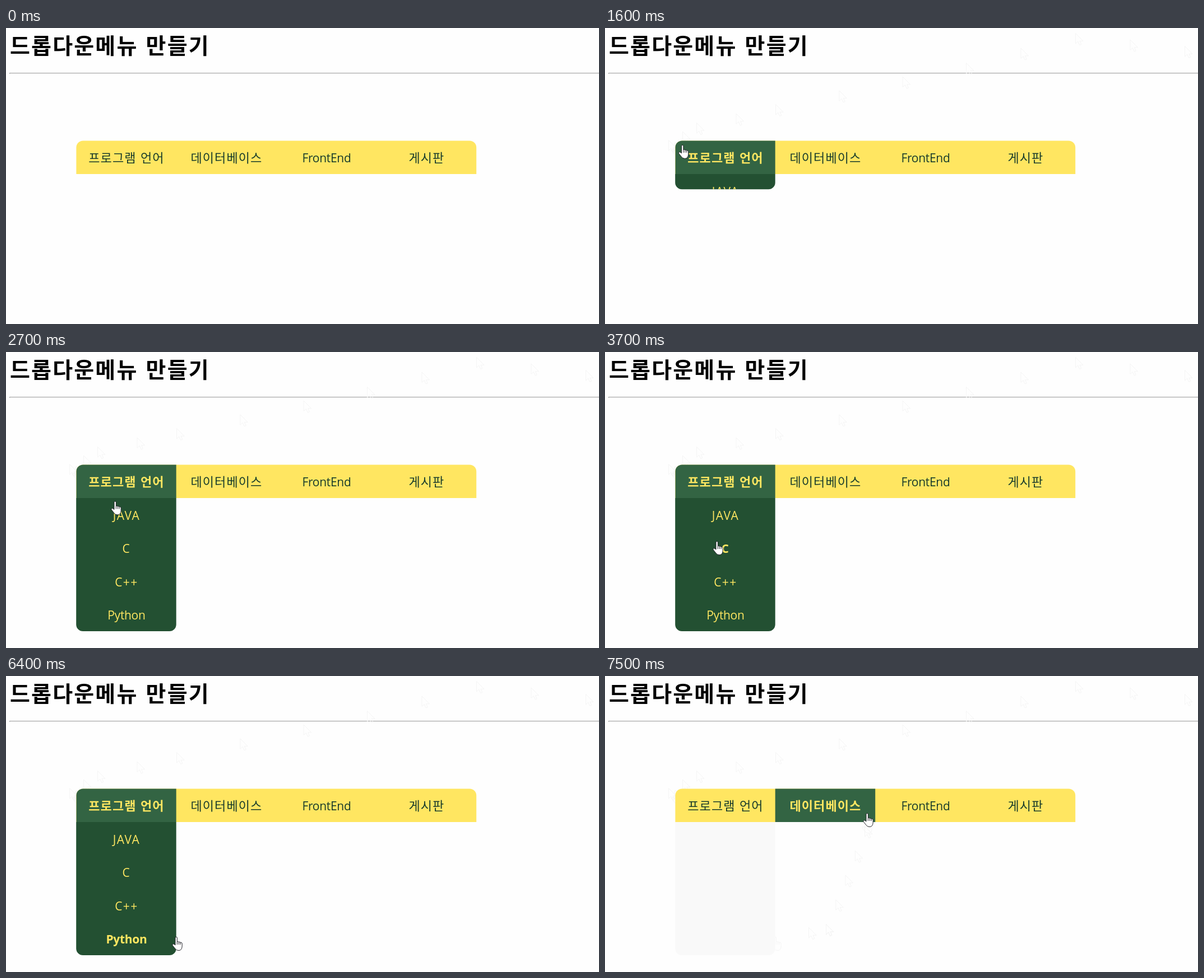
An HTML page that plays this animation: 1058x529 px, repeating every 8000 ms.

```html
<!DOCTYPE html>
<html lang="ko">
<head>
<meta charset="utf-8">
<title>드롭다운메뉴 만들기</title>
<style>
  html, body { margin: 0; width: 100%; height: 100%; overflow: hidden; background: #fefefe; }
  svg { display: block; width: 100%; height: 100%; }
  text { font-family: "Open Sans", "Noto Sans CJK KR", "Noto Sans CJK", sans-serif; font-size: 21px;
         text-anchor: middle; fill: #173b2b; }
  .ko { font-family: "Noto Sans CJK KR", "Noto Sans CJK", sans-serif; font-size: 22px; letter-spacing: 1.1px; }
  .latin { letter-spacing: -.3px; }
  .wide { letter-spacing: 1.4px; }
  .title { font-size: 39px; font-weight: 700; letter-spacing: 2.2px; word-spacing: 1px; text-anchor: start; fill: #000; }
  #items text, text.on { fill: #ffe761; }
  text.on { font-weight: 700; }
  #cursor { fill: #fff; stroke: #1b1b22; stroke-width: .95; }
  #trail { fill: none; stroke: #f5f5f5; }
</style>
</head>
<body>
<svg viewBox="0 0 1058 529">
  <defs>
    <path id="arrow" d="M.5.5V19L4.8 15.1 7.8 21.6 10.8 20.2 8 14.2H14Z"/>
    <g id="hand" transform="translate(-7 0)" stroke-linejoin="round">
      <path d="M6 15V2Q6 .5 7.7 .5T9.4 2V9Q10.8 7.8 12.4 9.4 13.8 8.6 15.2 10.2 17.8 9.6 18.2 12V17Q17.8 24.5 12 24.5 8 24.5 6 21.5L1 15.2Q.5 13 2.5 12.8 4.5 13.5 6 15Z"/>
      <path d="M9.4 9V14M12.4 9.4V14M15.2 10.2V14" fill="none"/>
    </g>
    <clipPath id="barShape"><rect x="125.4" y="201.5" width="713.8" height="80" rx="12"/></clipPath>
    <clipPath id="opening"><use href="#panel"/></clipPath>
  </defs>
  <rect width="1058" height="529" fill="#fefefe"/>
  <text class="ko title" x="7" y="45.5">드롭다운메뉴 만들기</text>
  <path d="M6 80.5H1058M6.5 80V82" stroke="#a6a6a6"/>
  <path d="M7 81.5H1058" stroke="#ececec"/>
  <g id="trail"></g>
  <path id="residue" fill="#f9f9f9"/>
  <g clip-path="url(#barShape)">
    <rect x="125" y="201" width="715" height="60" fill="#ffe661"/>
    <rect id="tab" y="201" width="178.5" height="60" fill="#336443"/>
  </g>
  <g id="heads"></g>
  <path id="panel" fill="#235032"/>
  <g id="items" clip-path="url(#opening)"></g>
  <use id="cursor"/>
</svg>
<script>
const LOOP = 8000, STEP = 100;
const LEFT = 125.2, TOP = 201, COL = 178.5, ROW = 59.5, BAR_END = 261, FULL = 4 * ROW;
const $ = id => document.getElementById(id);

function set(node, attrs) {
  for (const key in attrs) node.setAttribute(key, attrs[key]);
  return node;
}
const add = (parent, tag, attrs) =>
  parent.appendChild(set(document.createElementNS('http://www.w3.org/2000/svg', tag), attrs));
const show = (node, on) => set(node, { visibility: on ? 'visible' : 'hidden' });

// Pointer glides: start, end, then the point reached; it rests in between.
const ENTRY = { time: 300, x: 1034, y: 32 };
const glides = [
  [300, 500, 839, 9], [500, 700, 644, 62], [700, 1000, 304, 136], [1000, 1200, 163, 169],
  [1200, 1400, 113, 200], [1400, 1800, 162, 217.5],
  [2300, 2700, 194, 266.5], [2700, 2900, 193, 281],
  [3200, 3700, 199, 338],
  [4100, 4900, 271, 421],
  [5100, 5600, 279, 471],
  [6300, 6400, 303, 466], [6400, 6500, 363, 449], [6500, 6600, 394, 443],
  [6900, 7300, 463, 268], [7300, 7500, 467, 245]
];

function pointer(t) {
  let { x, y } = ENTRY;
  for (const [start, end, toX, toY] of glides) {
    const p = Math.min(1, Math.max(0, (t - start) / (end - start)));
    x += (toX - x) * p;
    y += (toY - y) * p;
  }
  return { x, y };
}

// Column and drop-down row under a point; -1 means none.
function hit({ x, y }) {
  const inside = x >= LEFT && x < LEFT + 4 * COL && y >= TOP;
  const column = inside ? Math.floor((x - LEFT) / COL) : -1;
  if (y < BAR_END) return { column, row: -1 };
  if (column !== 0 || y >= BAR_END + FULL) return { column: -1, row: -1 };
  return { column, row: Math.floor((y - BAR_END - 12) / ROW) };
}

const samples = [];
for (let time = ENTRY.time; time < LOOP; time += STEP) {
  const at = pointer(time), target = hit(at);
  const look = { href: target.column < 0 ? '#arrow' : '#hand', transform: `translate(${at.x} ${at.y})` };
  samples.push({ time, ...target, look, ghost: add($('trail'), 'use', look) });
}
const onMenu = samples.filter(s => s.column === 0);
const opened = onMenu[0].time, closed = onMenu[onMenu.length - 1].time + STEP;

function label(group, name, cls, x, y) {
  const node = add($(group), 'text', { x, y });
  node.textContent = name;
  return { node, cls };
}
const heads = ['프로그램 언어', '데이터베이스', 'FrontEnd', '게시판'].map((name, i) =>
  label('heads', name, name === 'FrontEnd' ? 'latin' : 'ko', LEFT + COL * (i + 0.5) + 0.5, 239.7));
const items = ['JAVA', 'C', 'C++', 'Python'].map((name, i) =>
  label('items', name, name === 'Python' ? 'latin' : 'wide', LEFT + COL / 2 + 0.5, 299.5 + ROW * i));
const mark = (labels, active) => labels.forEach(({ node, cls }, i) =>
  set(node, { class: cls + (i === active ? ' on' : '') }));

function panelPath(h) {
  const r = Math.min(12, h), bottom = BAR_END + h;
  return `M${LEFT} ${BAR_END}h${COL}V${bottom - r}a${r} ${r} 0 0 1 ${-r} ${r}h${2 * r - COL}a${r} ${r} 0 0 1 ${-r} ${-r}Z`;
}
set($('residue'), { d: panelPath(FULL) });

function panelHeight(t) {
  if (t < opened || t >= closed) return 0;
  const p = Math.min(1, Math.max(0, (t - opened - 12) / 400));
  return FULL * (0.5 - Math.cos(Math.PI * p) / 2);
}

function draw(t) {
  const now = samples.find(s => s.time === t);
  const column = now ? now.column : -1;
  for (const s of samples) show(s.ghost, s.time < t && s.look.transform !== now.look.transform);
  show($('cursor'), now);
  if (now) set($('cursor'), now.look);
  show($('tab'), column >= 0);
  set($('tab'), { x: LEFT + COL * column });
  mark(heads, column);
  mark(items, now ? now.row : -1);
  set($('panel'), { d: panelPath(panelHeight(t)) });
  show($('residue'), t >= closed);
}

const begin = performance.now();
function tick() {
  const t = (performance.now() - begin) % LOOP;
  draw(Math.floor(t / STEP) * STEP);
  requestAnimationFrame(tick);
}
tick();
</script>
</body>
</html>
```
